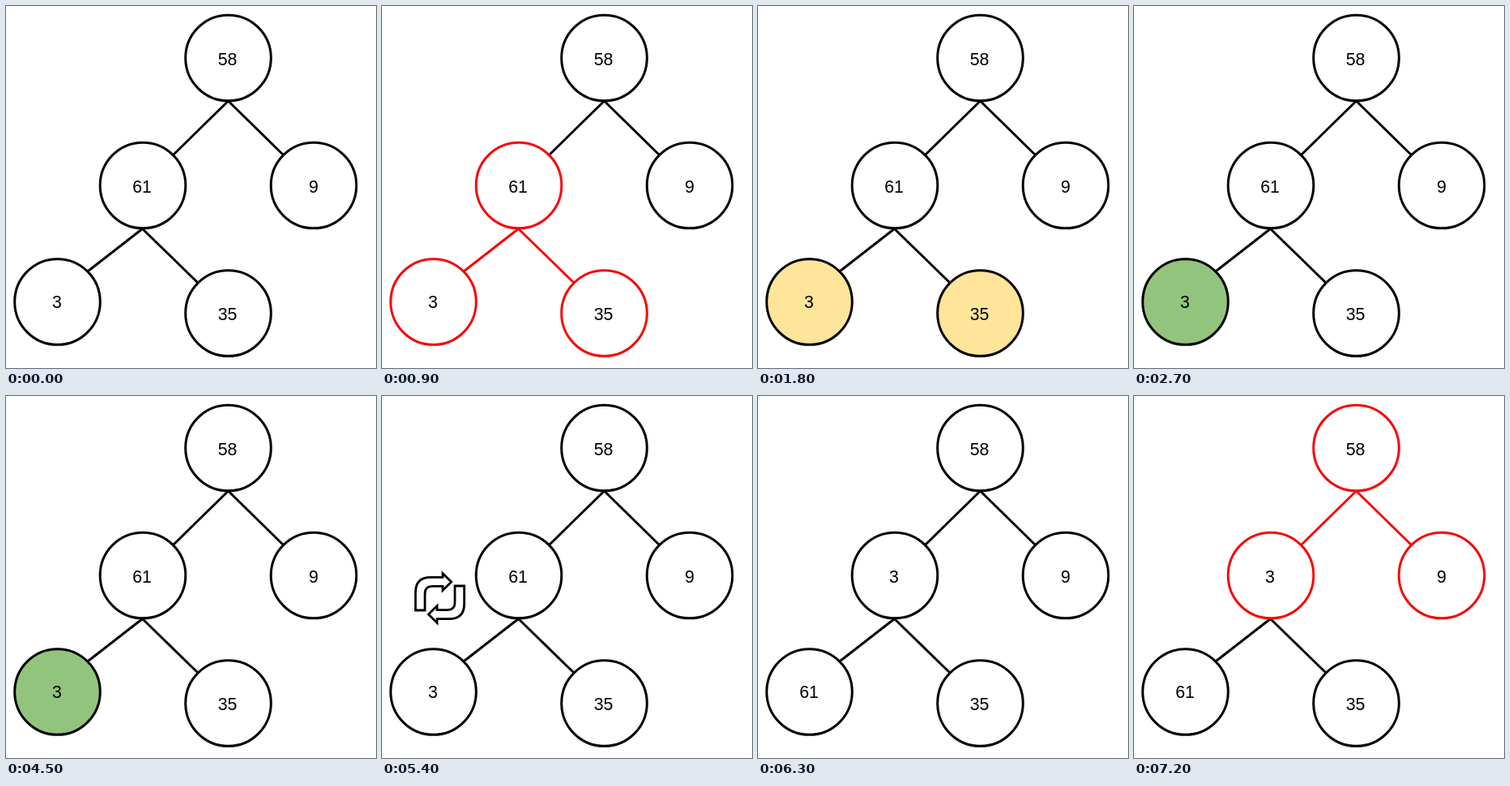
An HTML page for the animation above (8 s loop, 457 px wide and 446 px high).

```html
<!DOCTYPE html>
<html lang="en">
<head>
<meta charset="utf-8">
<title>Heapify</title>
<style>
  html, body { margin: 0; width: 100%; height: 100%; overflow: hidden; background: #fff; }
  svg { display: block; width: 457px; height: 446px; }
  circle, line, path { stroke: #000; stroke-width: 3; fill: #fff; }
  .red { stroke: #f60808; }
  path { stroke-width: 2.8; }
  text { font: 21.3px "Liberation Sans", Arial, sans-serif; text-anchor: middle; fill: #000; }
</style>
</head>
<body>
<svg id="stage" viewBox="0 0 457 446">
  <g id="edges"></g>
  <g id="nodes"></g>
  <g id="swap">
    <path id="arrow" d="M41.4 264V242Q41.4 223.3 60 223.3H75V218.6L85.6 229L75 239.4V234.4H62Q53 234.4 53 243.5V264Z"/>
    <use href="#arrow" transform="rotate(180 71.5 249)"/>
  </g>
</svg>
<script>
const LOOP = 8000, STEP = 900;
const YELLOW = '#ffe599', GREEN = '#93c47d';

// Node: circle centre, label centre x and baseline
const nodes = {
  root:  [274.5, 64, 273.5, 73],
  left:  [169, 221, 168, 230],
  right: [380, 221, 380, 230],
  leafA: [63.5, 364.5, 63, 372],
  leafB: [274.5, 378.5, 273.5, 387]
};
// Edge: parent, child, start and end points
const edges = [
  ['root', 'left', 274.5, 117, 207, 183],
  ['root', 'right', 274.5, 117, 342, 183],
  ['left', 'leafA', 168.5, 274.5, 101.5, 326.5],
  ['left', 'leafB', 168.5, 274.5, 236, 340]
];
const before = { root: 58, left: 61, right: 9, leafA: 3, leafB: 35 };
const after = { ...before, left: 3, leafA: 61 };

const steps = [
  {},
  { red: ['left', 'leafA', 'leafB'] },
  { fill: { leafA: YELLOW, leafB: YELLOW } },
  { fill: { leafA: GREEN } },
  { fill: { left: YELLOW, leafA: YELLOW } },
  { fill: { leafA: GREEN } },
  { swap: true },
  { values: after },
  { values: after, red: ['root', 'left', 'right'] }
];

const byId = id => document.getElementById(id);
function add(parent, tag, attrs) {
  const el = document.createElementNS('http://www.w3.org/2000/svg', tag);
  for (const key in attrs) el.setAttribute(key, attrs[key]);
  return parent.appendChild(el);
}

const lines = edges.map(([, , x1, y1, x2, y2]) =>
  add(byId('edges'), 'line', { x1, y1, x2, y2, 'stroke-linecap': 'round' }));
const circles = {}, labels = {};
for (const name in nodes) {
  const [cx, cy, x, y] = nodes[name];
  circles[name] = add(byId('nodes'), 'circle', { cx, cy, r: 52.8 });
  labels[name] = add(byId('nodes'), 'text', { x, y });
}

function show({ red = [], fill = {}, values = before, swap = false }) {
  for (const name in nodes) {
    circles[name].classList.toggle('red', red.includes(name));
    circles[name].style.fill = fill[name] || '#fff';
    labels[name].textContent = values[name];
  }
  edges.forEach(([from, to], i) =>
    lines[i].classList.toggle('red', red.includes(from) && red.includes(to)));
  byId('swap').style.display = swap ? '' : 'none';
}

let current = -1;
const start = performance.now();
function tick() {
  const t = (performance.now() - start) % LOOP;
  const index = Math.floor(t / STEP);
  if (index !== current) show(steps[current = index]);
  requestAnimationFrame(tick);
}
tick();
</script>
</body>
</html>
```
